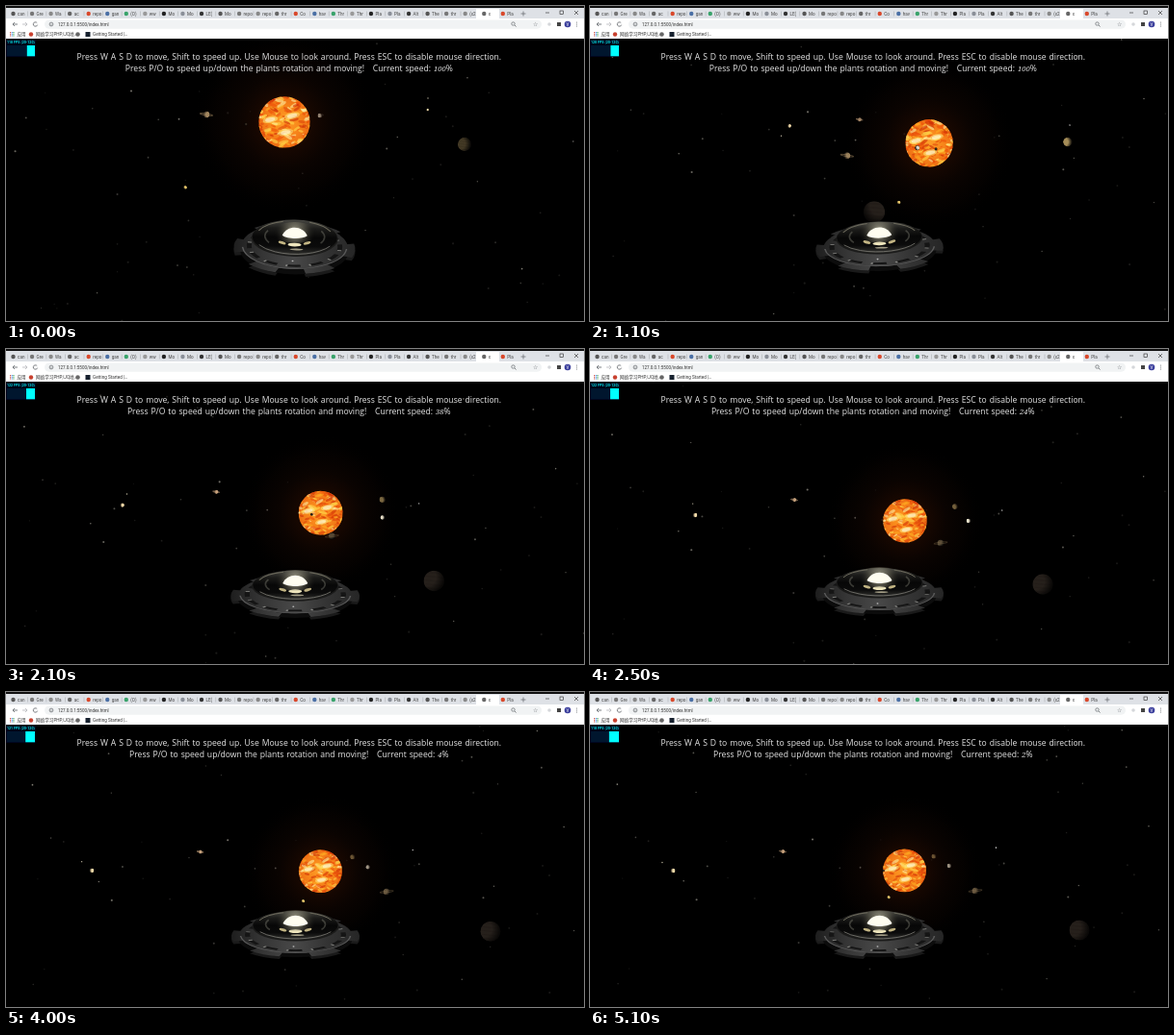
Animation of 600 by 328 pixels, one loop 5200 ms. Source, as an HTML page with a canvas:

```html
<!DOCTYPE html>
<html lang="en">
<head>
<meta charset="utf-8">
<title>Solar system</title>
<style>
html, body { margin: 0; width: 100%; height: 100%; overflow: hidden; background: #000; }
canvas { display: block; }
</style>
</head>
<body>
<canvas width="600" height="328"></canvas>
<script>
const ctx = document.querySelector('canvas').getContext('2d');
const LOOP = 5200, STEP = 100, SLOWDOWN = 1270, DECAY = -Math.log(0.89) / 100;
const SANS = '"Open Sans", sans-serif', UI = 'Roboto, "Noto Sans CJK SC", "Noto Sans CJK", sans-serif';
const clamp = (v, lo, hi) => Math.min(hi, Math.max(lo, v));
const wrap = (v, n) => ((v % n) + n) % n;

function seeded(seed) {
  return () => (seed = (seed * 16807) % 2147483647) / 2147483647;
}

// Cubic curve through the given values, with uneven spacing.
function track(keys, values, at) {
  const last = keys.length - 1;
  const slope = i => {
    const a = Math.max(0, i - 1), b = Math.min(last, i + 1);
    return (values[b] - values[a]) / (keys[b] - keys[a]);
  };
  let i = 0;
  while (i < last - 1 && at > keys[i + 1]) i++;
  const d = keys[i + 1] - keys[i], u = clamp((at - keys[i]) / d, 0, 1), v = 1 - u;
  return v * v * (1 + 2 * u) * values[i] + u * u * (3 - 2 * u) * values[i + 1] +
    u * v * d * (v * slope(i) - u * slope(i + 1));
}

// Planet time runs evenly, then fades out with the speed setting.
const speedAt = t => t < SLOWDOWN ? 100 : Math.max(2, Math.round(100 * Math.exp(-DECAY * (t - SLOWDOWN))));
const orbitTime = t => t < SLOWDOWN ? t : SLOWDOWN + (1 - Math.exp(-DECAY * (t - SLOWDOWN))) / DECAY;

const VIEW_KEYS = [0, 600, 1600, 2500, 3300, 5100];
const VIEW = {
  x: [289, 363, 330, 327, 326.5, 326.5],
  y: [121, 128.5, 158, 179, 186, 186],
  r: [26.7, 26, 23.5, 22.8, 22.5, 22.5],
  shipX: [299.5, 301, 300, 300.5, 300.5, 300.5],
  shipY: [252, 244.5, 259, 254, 254, 254],
  shipW: [63, 65, 67, 66.5, 66.5, 66.5],
  shipH: [27, 24.5, 23.5, 22, 22, 22],
  tilt: [0.02, -0.04, 0, 0, 0, 0]
};

// Positions are relative to the sun.
const ORBIT_KEYS = [0, 600, 1600, 2500, 5100].map(orbitTime);
const PLANETS = [
  { x: [149, -79, -181, -218, -240.5], y: [-13, -22, -12, -6, 0], r: [1.6, 2.5], color: '#f0d9a8', moon: 1 },
  { x: [15, -43, -95, -115, -126.5], y: [-8, -25, -22, -22, -20], r: [2.3, 2.2], color: '#c7a27c', ring: 1 },
  { x: [187, 194, 90, 52, 30.5], y: [23, 10.5, -11, -15, -15], r: [7.2, 2.6], color: '#a58d58' },
  { x: [37, -60, 48, 66, 46.5], y: [-7, -5.5, 12, 0, -5], r: [2.5, 2.4], color: '#efe6cf' },
  { x: [-81, -119, -36, 37, 73.5], y: [-8, -0.5, 24, 23, 21], r: [3.4, 3.6], color: '#c9a877', ring: 2 },
  { x: [-310, -187, 60, 143, 181.5], y: [45, 60, 78, 66, 62], r: [12, 10.5], color: '#6b5a4c' },
  { x: [-40, -19, 20, -24, -22], y: [2, 3.5, 7, -1, 0], r: [1.6, 1.2], color: '#33291f' },
  { x: [-103, -45, -27, -27, -16.5], y: [68, 38.5, 82, 52, 28], r: [2, 1.9], color: '#e8c76a', bright: 1 },
  { x: [300, 200, 109, 101, 95], y: [20, -20, -12, -11, -24], r: [1, 0.9], color: '#ddd' }
];

const random = seeded(71);
const STARS = Array.from({ length: 120 }, () => ({
  x: random() * 800, y: random() * 420, size: 0.5 + random() * 0.6, alpha: 0.12 + random() ** 3 * 0.55
}));
const SPOT_COLORS = ['#ffd84a', '#ee4d08', '#cf3005', '#ffae22', '#e0470a', '#fff0a0'];
const SPOTS = Array.from({ length: 320 }, (_, i) => ({
  lon: random() * 6.28, lat: Math.asin(random() * 2 - 1), size: 0.03 + random() * 0.07,
  color: SPOT_COLORS[i % 6]
}));

function disc(x, y, rx, ry, fill, angle = 0) {
  ctx.fillStyle = fill;
  ctx.beginPath();
  ctx.ellipse(x, y, rx, ry, angle, 0, 7);
  ctx.fill();
}

function rect(x, y, w, h, fill) {
  ctx.fillStyle = fill;
  ctx.fillRect(x, y, w, h);
}

function text(str, x, y, font, fill) {
  ctx.font = font;
  ctx.fillStyle = fill;
  ctx.fillText(str, x, y);
}

function line(color, width, ...points) {
  ctx.strokeStyle = color;
  ctx.lineWidth = width;
  ctx.beginPath();
  points.forEach(([x, y]) => ctx.lineTo(x, y));
  ctx.stroke();
}

function arc(x, y, rx, ry, from, to, width, color, angle = 0) {
  ctx.strokeStyle = color;
  ctx.lineWidth = width;
  ctx.beginPath();
  ctx.ellipse(x, y, rx, ry, angle, from, to);
  ctx.stroke();
}

function gradient(g, stops) {
  stops.forEach((c, i) => g.addColorStop(i / (stops.length - 1), c));
  return g;
}
const radial = (x, y, r0, r1, ...stops) => gradient(ctx.createRadialGradient(x, y, r0, x, y, r1), stops);
const linear = (x0, y0, x1, y1, ...stops) => gradient(ctx.createLinearGradient(x0, y0, x1, y1), stops);

function drawStars(view, s) {
  for (const star of STARS) {
    ctx.globalAlpha = star.alpha;
    const x = wrap(star.x + view.x + s * 0.03, 800) - 100;
    const y = wrap(star.y + view.y, 420) - 40;
    disc(x, y, star.size, star.size, '#cfcabc');
  }
  ctx.globalAlpha = 1;
}

function drawSun({ x, y, r }, s) {
  disc(x, y, r * 3.6, r * 3.6, radial(x, y, r, r * 3.6, 'rgba(48,15,2,.5)', 'rgba(26,9,3,.4)', 'rgba(14,5,2,.3)', 'rgba(0,0,0,0)'));
  ctx.save();
  ctx.beginPath();
  ctx.arc(x, y, r, 0, 7);
  ctx.clip();
  rect(x - r, y - r, r * 2, r * 2, radial(x, y, 0, r, '#fd9f28', '#f98a1c', '#ee6f14'));
  ctx.globalAlpha = 0.6;
  for (const { lon, lat, size, color } of SPOTS) {
    const a = lon + s * 0.0012;
    if (Math.cos(a) < 0) continue;
    disc(x + r * Math.sin(a) * Math.cos(lat), y + r * Math.sin(lat),
      r * size * (0.5 + 1.6 * Math.cos(a)), r * size * 0.7, color, Math.sin(lon * 9) * 0.6);
  }
  for (const [dx, dy] of [[-0.55, -0.1], [0.3, -0.25], [0.05, 0.4]]) {
    disc(x + r * dx, y + r * dy, r * 0.3, r * 0.13, '#ffe87a', -0.2);
    disc(x + r * dx, y + r * dy, r * 0.2, r * 0.08, '#fffbe0', -0.2);
  }
  ctx.restore();
}

function drawPlanet(p, sun, s) {
  const x = sun.x + p.dx, y = sun.y + p.dy;
  const r = p.r[0] + (p.r[1] - p.r[0]) * s / ORBIT_KEYS[4];
  const light = p.bright ? 1 : clamp(1 - (p.dy - 3) / 32, 0.3, 1);
  const shift = r * 0.7 / (Math.hypot(p.dx, p.dy) || 1);
  disc(x, y, r, r, '#080706');
  ctx.globalAlpha = light;
  ctx.save();
  ctx.beginPath();
  ctx.arc(x, y, r, 0, 7);
  ctx.clip();
  disc(x, y, r, r, radial(x - p.dx * shift, y - p.dy * shift, 0, r * 1.6, p.color, p.color, '#0c0a08'));
  if (r > 5) for (let i = -2; i < 3; i++)
    disc(x, y + i * r * 0.38, r, r * 0.07, 'rgba(20,14,10,.4)', 0.1);
  ctx.restore();
  if (p.ring) arc(x, y, r * (1.2 + p.ring * 0.4), r * 0.25, 0, 7, 0.6, p.color, p.dx < 0 ? 0.15 : -0.12);
  if (p.moon) disc(x + 12 * Math.sin(s / 200), y - 12 * Math.cos(s / 300), 0.7, 0.7, '#b9b29c');
  ctx.globalAlpha = 1;
}

function drawShip(v) {
  const metal = linear(-64, 0, 64, 0, '#1e1e1e', '#363636', '#484848', '#333', '#262626');
  const ring = (radius, width, angle, span, color) =>
    arc(0, 0, radius, radius, angle - span, angle + span, width, color);
  const flaps = color => {
    for (let i = 0; i < 6; i++) ring(58, 12, i * Math.PI / 3 + v.tilt * 3, 0.27, color);
  };
  ctx.save();
  ctx.translate(v.shipX, v.shipY);
  ctx.rotate(v.tilt);
  ctx.save();
  ctx.scale(v.shipW / 64, v.shipH / 64);
  ctx.translate(0, 8);
  flaps('#1a1a1a');
  disc(0, 0, 57, 57, '#0c0c0c');
  ctx.translate(0, -8);
  flaps(metal);
  ctx.translate(0, -4);
  disc(0, 0, 56, 56, metal);
  ring(55, 1.5, Math.PI / 2, 1.5, '#5a5a5a');
  for (let i = 0; i < 12; i++) {
    ring(48, 5, i * Math.PI / 6, 0.14, '#151515');
    ring(48, 4, i * Math.PI / 6 + 0.17, 0.02, '#8a8a86');
  }
  ctx.restore();

  // Glossy dome with its lamp and reflections.
  const h = v.shipH * 0.7;
  ctx.translate(0, -11);
  disc(0, 1, 45, h, '#1b1b1a');
  disc(0, 0, 44, h - 0.5, linear(0, -h, 0, h, '#4a4a45', '#1c1c1a', '#070707', '#0b0b0b', '#343431'));
  arc(0, 0, 42, h - 1.5, 0.5, 2.64, 0.8, '#7d7c75');
  arc(0, -0.5, 40, h - 2, 3.5, 4.4, 1, '#6d6a5c');
  arc(0, -0.5, 40, h - 2, 5.1, 5.9, 1, '#6d6a5c');
  arc(0, -1, 31, h * 0.7, 2.6, 3.6, 1.6, 'rgba(150,148,135,.35)');
  arc(0, -1, 31, h * 0.7, 5.8, 6.8, 1.6, 'rgba(150,148,135,.35)');
  for (const side of [-1, 1]) disc(side * 13, h * 0.3, 4, 1.5, '#c4b684', -side * 0.3);
  disc(0, h * 0.4, 7, 1.9, '#efe6bd');
  disc(2, h * 0.66, 7, 0.9, '#a39d86');
  disc(0, -5, 24, 11, radial(0, -5, 3, 22, 'rgba(255,250,220,.55)', 'rgba(150,145,120,.25)', 'rgba(0,0,0,0)'));
  ctx.fillStyle = '#fffdf0';
  ctx.beginPath();
  ctx.moveTo(-13, -2);
  ctx.bezierCurveTo(-8, -13, 8, -13, 13, -2);
  ctx.bezierCurveTo(8, 2, -8, 2, -13, -2);
  ctx.fill();
  ctx.restore();
  disc(v.shipX - 2, v.shipY + v.shipH * 0.5, 1, 0.8, '#bbb');
}

function drawMessage(speed) {
  const font = '8.6px ' + SANS, digits = 'italic 7.6px "Noto Serif", serif', color = '#e6e6e6';
  ctx.wordSpacing = '0.7px';
  ctx.textAlign = 'center';
  text('Press W A S D to move, Shift to speed up. Use Mouse to look around. Press ESC to disable mouse direction.',
    293.8, 56, font, color);
  ctx.textAlign = 'left';
  const parts = [
    ['Press P/O to speed up/down the plants rotation and moving!   Current speed: ', font],
    [String(speed), digits], ['%', font]
  ].map(([str, f]) => {
    ctx.font = f;
    return [str, f, ctx.measureText(str).width];
  });
  let x = 293.8 - parts.reduce((sum, p) => sum + p[2], 0) / 2;
  for (const [str, f, width] of parts) {
    text(str, x, 68.3, f, color);
    x += width;
  }
  ctx.wordSpacing = '0px';
}

function drawMeter(t) {
  const seconds = Math.floor(t / 1000), edge = 21.8 - seconds * 0.39;
  rect(0, 34, 31, 19, '#000018');
  text(118 + seconds * 7 % 5 + ' FPS (20-120)', 1, 38.5, 'bold 3.6px ' + UI, '#0ee');
  rect(1, 41, 29, 11.3, '#00162e');
  rect(edge, 41, 30 - edge, 11.3, '#0ff');
}

const TABS = 'can Gre Wa ac repo gan (O) ww Mo Mo LE( Mo repo repo thr Co hav Thr Thr Pla Pla Alt The thr (x2 x Pla'.split(' ');
const ICONS = ['#555', '#222', '#4a6fa5', '#888', '#333', '#999', '#d9482b', '#777', '#8a8f98', '#39a36b', '#666'];

function drawBrowser() {
  const gray = '#5f6368', small = '4.6px ' + UI;
  rect(0, 0, 600, 34, '#fff');
  rect(0, 0, 600, 13, '#dee1e6');
  rect(0, 0, 600, 2, '#111');
  rect(488, 3, 24, 10, '#fff');
  TABS.forEach((name, i) => {
    const x = 7.5 + i * 19.55;
    disc(x, 8, 2.2, 2.2, ICONS[i * 7 % ICONS.length]);
    text(name, x + 4.5, 9.7, small, '#444');
    if (i < 24) rect(x + 14.6, 5.5, 0.5, 5, '#a5a8ad');
  });
  line(gray, 0.7, [534.5, 8], [539.5, 8]);
  line(gray, 0.7, [537, 5.5], [537, 10.5]);
  line('#222', 0.6, [560, 7], [564, 7]);
  ctx.strokeRect(575, 5, 3.6, 3.6);
  line('#222', 0.6, [590, 5], [594, 9]);
  line('#222', 0.6, [594, 5], [590, 9]);

  line(gray, 0.8, [9, 17], [7, 19], [9, 21]);
  line(gray, 0.8, [7, 19], [12, 19]);
  line('#b5b7ba', 0.8, [20, 17], [22, 19], [20, 21]);
  line('#b5b7ba', 0.8, [17, 19], [22, 19]);
  arc(30.5, 19, 2.2, 2.2, 0.3, 5.6, 0.8, gray);
  ctx.fillStyle = '#f1f3f4';
  ctx.beginPath();
  ctx.roundRect(40, 14.5, 516, 9.2, 4.6);
  ctx.fill();
  arc(47, 19, 1.9, 1.9, 0, 7, 0.7, gray);
  arc(526.5, 18.5, 1.7, 1.7, 0, 7, 0.7, gray);
  line(gray, 0.8, [528, 20], [529.5, 21.5]);
  rect(46.7, 18.6, 0.6, 1.6, gray);
  ctx.clearRect(0, 0, 0, 0);
  text('127.0.0.1:5500/index.html', 54, 20.7, '4.5px ' + UI, '#333');
  text('☆', 547, 21, '6px "DejaVu Sans", sans-serif', gray);
  disc(564, 19, 1.8, 1.8, '#d5d7da');
  rect(572, 17, 4, 4, '#444');
  disc(583, 19, 3.3, 3.3, '#3b3f9c');
  text('V', 581.6, 20.6, small, '#fff');
  for (const y of [17, 19, 21]) disc(592.5, y, 0.5, 0.5, gray);

  for (let i = 0; i < 9; i++)
    rect(4 + i % 3 * 1.7, 27 + Math.floor(i / 3) * 1.7, 1.1, 1.1, ['#db5a4a', '#4c8df0', '#3fa45b'][i % 3]);
  text('应用', 11.5, 31.3, small, '#333');
  disc(26, 29.5, 2.2, 2.2, '#c8402e');
  text('网络学习PHP/JQ地…', 31, 31.3, small, '#333');
  disc(74.5, 29.5, 2.3, 2.3, '#666');
  rect(82.5, 27, 5, 5, '#17212e');
  text('Getting Started |…', 90, 31.3, small, '#333');
}

function draw(now) {
  const t = Math.floor(now % LOOP / STEP) * STEP, s = orbitTime(t);
  const view = {};
  for (const name in VIEW) view[name] = track(VIEW_KEYS, VIEW[name], t);
  const planets = PLANETS.map(p => ({
    ...p, dx: track(ORBIT_KEYS, p.x, s), dy: track(ORBIT_KEYS, p.y, s)
  }));

  rect(0, 0, 600, 328, '#000');
  drawStars(view, s);
  planets.filter(p => p.dy < 0).forEach(p => drawPlanet(p, view, s));
  drawSun(view, s);
  planets.filter(p => p.dy >= 0).forEach(p => drawPlanet(p, view, s));
  drawShip(view);
  drawMessage(speedAt(t));
  drawMeter(t);
  drawBrowser();
  requestAnimationFrame(draw);
}
requestAnimationFrame(draw);
</script>
</body>
</html>
```
